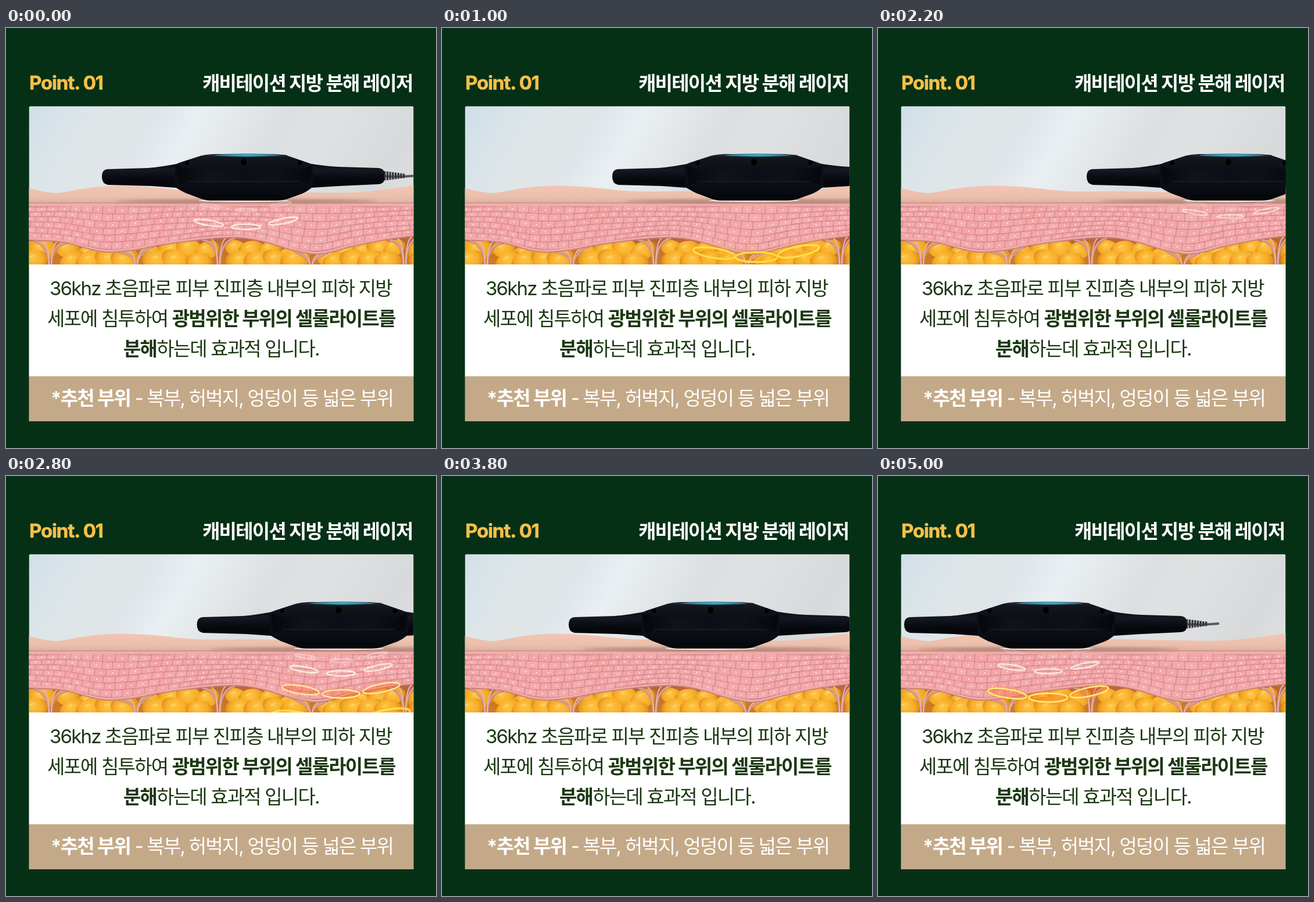
An HTML page with a canvas for the animation above (5.2 s loop, 740x723 px).

```html
<!DOCTYPE html>
<html lang="ko">
<head>
<meta charset="utf-8">
<style>
  html, body { margin: 0; width: 740px; height: 723px; overflow: hidden; background: #053016; }
  canvas, svg { position: absolute; left: 0; top: 0; }
  text { font: 400 33px Inter, "Noto Sans CJK KR", "Noto Sans CJK", sans-serif; letter-spacing: -1.83px; fill: #1b3812; white-space: pre; }
  .b { font-weight: 700; letter-spacing: -1.75px; }
  .title { fill: #fff; }
  .gold { fill: #f6c04c; stroke: #f6c04c; stroke-width: .6px; letter-spacing: -1.15px; }
  .light { fill: #fff; }
</style>
</head>
<body>
<canvas width="740" height="723"></canvas>
<svg width="740" height="723">
  <rect x="39.5" y="407" width="662" height="193" fill="#fff"/>
  <rect x="39.5" y="599.5" width="662" height="77.5" fill="#c4a988"/>
  <text class="b gold" x="40" y="106">Point. 01</text>
  <text class="b title" x="338" y="107">캐비테이션 지방 분해 레이저</text>
  <text x="75" y="460">36khz 초음파로 피부 진피층 내부의 피하 지방</text>
  <text x="71" y="512">세포에 침투하여 <tspan class="b">광범위한 부위의 셀룰라이트를</tspan></text>
  <text x="202" y="564"><tspan class="b">분해</tspan>하는데 효과적 입니다.</text>
  <text class="light" x="77" y="649"><tspan class="b">*추천 부위</tspan> - 복부, 허벅지, 엉덩이 등 넓은 부위</text>
</svg>
<script>
const LOOP = 5200, STEP = 200;
const PIC = { x: 39.5, y: 134.5, w: 662, h: 273 };
const canvas = document.querySelector('canvas');
const ctx = canvas.getContext('2d');

// Smooth curve through [x, y] points (cubic Hermite)
function spline(points) {
  const slope = i => {
    const a = points[Math.max(0, i - 1)], b = points[Math.min(points.length - 1, i + 1)];
    return (b[1] - a[1]) / (b[0] - a[0]);
  };
  return x => {
    let i = 0;
    while (i < points.length - 2 && x > points[i + 1][0]) i++;
    const [x0, y0] = points[i], [x1, y1] = points[i + 1];
    const w = x1 - x0, s = (x - x0) / w, r = 1 - s;
    return y0 * r * r * (1 + 2 * s) + y1 * s * s * (3 - 2 * s)
      + w * s * r * (slope(i) * r - slope(i + 1) * s);
  };
}

const skinTop = spline([[40, 276], [85, 284], [130, 277], [180, 272], [240, 273], [330, 281],
  [420, 281], [520, 283], [600, 283], [650, 278], [701, 271]]);
const dermisEnd = spline([[40, 364], [100, 368], [165, 384], [215, 382], [270, 372], [350, 362],
  [400, 360], [440, 366], [500, 383], [540, 388], [600, 374], [650, 364], [701, 357]]);
const deviceX = spline([[-200, 383], [0, 409], [1000, 537], [2085, 604], [3200, 540], [3800, 462],
  [4600, 350], [5000, 289], [5200, 259]]);
const ringBirths = [-540, -230, 150, 1820, 2050, 2280, 2500, 4215, 4510, 4845];

function gradient(c, x0, y0, x1, y1, colors) {
  const g = c.createLinearGradient(x0, y0, x1, y1);
  colors.forEach((color, i) => g.addColorStop(i / (colors.length - 1), color));
  return g;
}

function polygon(c, points, fill) {
  c.beginPath();
  points.forEach(([x, y]) => c.lineTo(x, y));
  c.closePath();
  c.fillStyle = fill;
  c.fill();
}

function ellipse(c, x, y, rx, ry, angle = 0) {
  c.beginPath();
  c.ellipse(x, y, rx, ry, angle, 0, 7);
}

function area(c, top, bottom, fill) {
  const xs = Array.from({ length: 168 }, (_, i) => 38 + i * 4);
  polygon(c, [...xs.map(x => [x, top(x)]), ...xs.reverse().map(x => [x, bottom(x)])], fill);
}

function makeTissue() {
  const layer = document.createElement('canvas');
  layer.width = 740;
  layer.height = 723;
  const c = layer.getContext('2d');
  let seed = 11;
  const random = () => (seed = seed * 16807 % 2147483647) / 2147483647;

  area(c, dermisEnd, () => 410, gradient(c, 0, 360, 0, 407, ['#b8643c', '#d07f22']));
  drawFat(c, random);
  drawFibres(c);
  area(c, skinTop, () => 306, gradient(c, 0, 272, 0, 306, ['#f1c6b2', '#ebc0ae', '#dcaa9c']));
  drawCells(c, random);
  return layer;
}

function drawFat(c, random) {
  for (const [start, end] of [[30, 62], [96, 206], [242, 346], [386, 506], [548, 668], [704, 720]]) {
    for (let row = 0; row < 2; row++) {
      for (let x = start + row * 9; x < end; x += 25 + random() * 14) {
        const r = 16 + random() * 6, px = Math.min(x + 10, end);
        const y = Math.max(dermisEnd(px) + 10, 379 + row * 19) + random() * 5;
        const g = c.createRadialGradient(px - 4, y - 5, 2, px, y, r * 1.3);
        g.addColorStop(0, '#fdc344');
        g.addColorStop(0.6, '#f6ac26');
        g.addColorStop(1, '#d88a1c');
        ellipse(c, px, y, r * 1.25, r * 0.85, random() - 0.5);
        c.fillStyle = g;
        c.fill();
        ellipse(c, px - 5, y - 6, 5, 1.5, -0.4);
        c.fillStyle = 'rgba(255,226,140,.5)';
        c.fill();
      }
    }
  }
}

function drawFibres(c) {
  c.lineCap = 'round';
  for (const x of [76, 224, 366, 525, 686]) {
    for (const [spread, width, color] of [[28, 4, '#b9736a'], [27, 3, '#dc9f9c'], [12, 2, '#e9b5ae']]) {
      c.strokeStyle = color;
      c.lineWidth = width;
      c.beginPath();
      for (const side of [-1, 1]) {
        const endX = x + side * spread;
        c.moveTo(x + side * 2, 409);
        c.quadraticCurveTo(x + side * 2, dermisEnd(x) + 8, endX, dermisEnd(endX) + 2);
      }
      c.stroke();
    }
  }
}

function drawCells(c, random) {
  const rows = 6, top = 307;
  const edge = (x, j) => top + (dermisEnd(x) - 3 - top) * j / rows + Math.sin(x / 31 + j) * 0.9;
  area(c, x => dermisEnd(x) - 4, x => dermisEnd(x) + 2, '#cb8079');
  area(c, () => 301, x => dermisEnd(x), '#f0aeaa');
  area(c, () => top, x => dermisEnd(x) - 3, '#cb8085');
  c.lineJoin = 'round';
  c.lineWidth = 2.4;
  for (let j = 0; j < rows; j++) {
    let x = 30 - (j % 2) * 10;
    while (x < 705) {
      const w = 17 + random() * 6, l = x + 1.7, r = x + w - 1.7;
      const corners = [[l, edge(l, j) + 1.7], [r, edge(r, j) + 1.7],
        [r - 1, edge(r, j + 1) - 1.7], [l - 1, edge(l, j + 1) - 1.7]];
      const color = `hsl(${357 + random() * 3} ${74 + random() * 6}% ${80 + random() * 2}%)`;
      polygon(c, corners, color);
      c.strokeStyle = color;
      c.stroke();
      const mx = x + w / 2;
      ellipse(c, mx, edge(mx, j + 0.5), 1.2, 1.2);
      c.fillStyle = 'rgba(255,244,235,.85)';
      c.fill();
      x += w;
    }
  }
  area(c, () => 300, () => 302, 'rgba(174,112,102,.4)');
}

function drawSky(t) {
  const x = 40 + 14 * Math.sin(t / LOOP * 2 * Math.PI);
  ctx.fillStyle = gradient(ctx, x, 135, x + 560, 465, ['#d0dfe7', '#dae4e9', '#e0e6e8', '#dfe5e8',
    '#e9eff2', '#e3e7e9', '#dcdfe1', '#e0e1e2', '#dcddde', '#d8d9da', '#dfe0e1']);
  ctx.fillRect(PIC.x, PIC.y, PIC.w, PIC.h);
}

function drawRings(t, cx) {
  for (const birth of ringBirths) {
    const age = t - birth, y = 300 + (age * 0.011) ** 2;
    if (age < 0 || y > 425) continue;
    const grow = y - 315;
    const heat = Math.min(1, Math.max(0, (y - 357) / 26));
    const spread = 61 + grow * 0.16, rx = 21 + grow * 0.21, ry = Math.max(1.5, 3 + grow * 0.075);
    ctx.save();
    ctx.globalAlpha = Math.min(1, (y - 297) / 36);
    ctx.strokeStyle = `rgb(255 ${248 - 24 * heat} ${232 - 165 * heat})`;
    ctx.fillStyle = `rgba(255,80,30,${0.8 * heat * (1 - heat)})`;
    ctx.lineWidth = 1.7 + heat * 1.5;
    ctx.shadowColor = heat ? `rgba(255,${60 + 100 * heat},20,${heat})` : 'rgba(255,255,255,.7)';
    ctx.shadowBlur = 3 + heat * 10;
    for (const [side, dy, tilt] of [[-1, 0, 0.16], [0, 7, 0], [1, -3, -0.2]]) {
      ellipse(ctx, cx + 4 + side * spread, y + dy, rx, ry, tilt);
      ctx.fill();
      ctx.stroke();
    }
    ctx.restore();
  }
}

function drawShadow(cx) {
  ctx.save();
  ctx.filter = 'blur(2px)';
  ellipse(ctx, cx + 5, 298, 225, 3.5);
  ctx.fillStyle = 'rgba(105,65,58,.36)';
  ctx.fill();
  ctx.restore();
  ellipse(ctx, cx, 297, 78, 2.5);
  ctx.fillStyle = '#f3ddd9';
  ctx.fill();
}

function drawCable() {
  ctx.strokeStyle = '#565759';
  ctx.lineWidth = 4;
  ctx.beginPath();
  ctx.moveTo(238, 255);
  ctx.quadraticCurveTo(270, 257, 298, 254);
  ctx.stroke();
  for (let i = 0; i < 8; i++) {
    const h = 16 - i * 1.2;
    ctx.fillStyle = '#35363a';
    ctx.fillRect(241 + i * 4.7, 254.5 - h / 2, 3.4, h);
  }
}

function drawDevice(cx) {
  ctx.save();
  ctx.translate(cx, 0);
  drawCable();

  const handle = new Path2D(`M-235 243 L-165 241 Q-140 239 -105 232 L105 232 Q140 238 165 239
    L232 241 Q242 242 242 250 L242 261 Q241 269 230 269 L165 272 L117 275 L-117 275
    L-160 272 L-234 270 Q-244 268 -244 256 Q-244 244 -235 243 Z`);
  ctx.fillStyle = gradient(ctx, 0, 234, 0, 275, ['#0b0d13', '#161921', '#0b0e15', '#05070b', '#080a10']);
  ctx.fill(handle);

  const body = new Path2D(`M-74 220 Q-62 217 -45 217 L45 217 Q62 217 76 220 L108 231 Q119 234 119 239
    L119 273 Q112 280 101 285 L76 294 Q68 297 56 297 L-56 297 Q-66 297 -76 293 L-100 284 Q-112 278 -118 274
    L-119 239 Q-119 234 -108 231 Z`);
  ctx.fillStyle = gradient(ctx, 0, 217, 0, 297, ['#151820', '#10131a', '#090c12', '#0c0f17', '#080b11', '#030508']);
  ctx.fill(body);

  polygon(ctx, [[-116, 237], [-98, 243], [98, 243], [117, 237], [113, 268], [96, 266], [-96, 266], [-112, 270]],
    gradient(ctx, -115, 0, 115, 0, ['#05070b', '#10131b', '#0c0f17', '#0e1119', '#05070b']));
  polygon(ctx, [[-98, 263], [100, 263], [96, 265], [-96, 265]], '#171a22');

  ellipse(ctx, 4, 219.5, 71, 3);
  ctx.fillStyle = '#20262f';
  ctx.fill();
  ellipse(ctx, 6, 219, 56, 2.2);
  ctx.fillStyle = gradient(ctx, -50, 0, 62, 0, ['#247b96', '#3fa9bd', '#287d9e']);
  ctx.fill();

  ctx.fillStyle = '#000';
  for (const [x, y, rx, ry] of [[0, 231, 5, 5.5], [-97, 232, 3.5, 4], [97, 232, 4, 4]]) {
    ellipse(ctx, x, y, rx, ry);
    ctx.fill();
  }
  ctx.restore();
}

const tissue = makeTissue();

function draw(now) {
  const t = Math.floor(now % LOOP / STEP) * STEP;
  const cx = deviceX(t);
  ctx.fillStyle = '#053016';
  ctx.fillRect(0, 0, 740, 723);
  ctx.save();
  ctx.beginPath();
  ctx.roundRect(PIC.x, PIC.y, PIC.w, PIC.h, [3, 3, 0, 0]);
  ctx.clip();
  drawSky(t);
  ctx.drawImage(tissue, 0, 0);
  drawShadow(cx);
  drawRings(t, cx);
  drawDevice(cx);
  ctx.restore();
}

const start = performance.now();
function tick() {
  draw(performance.now() - start);
  requestAnimationFrame(tick);
}
tick();
</script>
</body>
</html>
```
